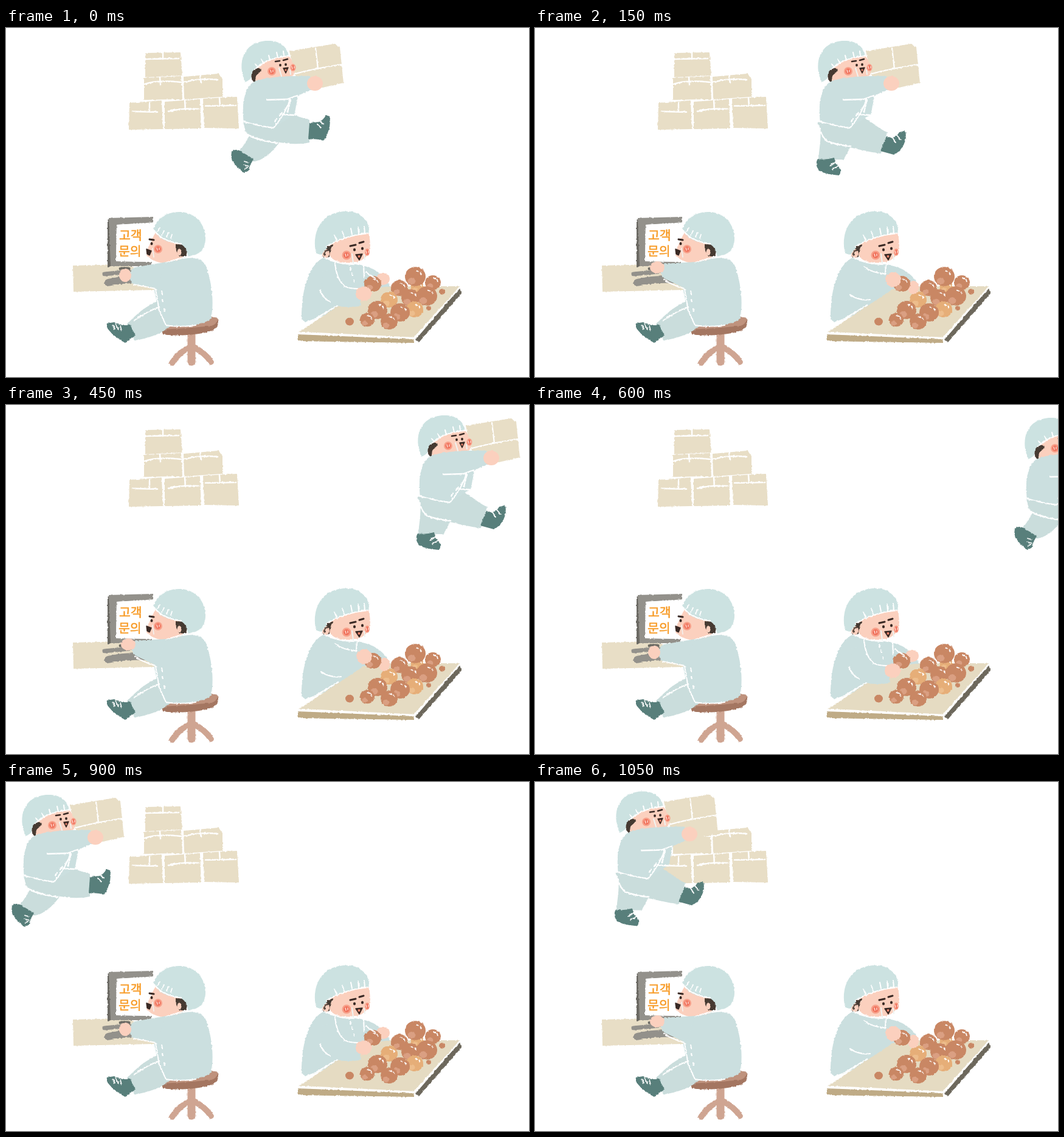
An HTML page that plays this animation: 860x573 px, repeating every 1.2 s.

```html
<!DOCTYPE html>
<html lang="ko">
<head>
<meta charset="utf-8">
<title>작업장</title>
<style>
html, body { margin: 0; width: 100%; height: 100%; overflow: hidden; background: #fff; }
svg { display: block; width: 100vw; height: 100vh; }
text { font: 500 20.5px "Noto Sans CJK KR", "Noto Sans CJK", sans-serif; }
</style>
</head>
<body>
<svg id="stage" viewBox="0 0 860 573"></svg>
<script>
const C = {
  coat: '#cbdfdf', cap: '#cce2e1', pants: '#cadddc', boot: '#587f7b', skin: '#fbd0be',
  hair: '#463a32', ink: '#3a2a25', cheek: '#f7a08a', box: '#e8dec6', white: '#fff',
  gray: '#93918b', dark: '#6b6963', nut: '#c98764', tan: '#e6ae78', spot: '#da9f82'
};

const fill = (d, c) => `<path d="${d}" fill="${c}"/>`;
const line = (d, w = 2, c = C.white) =>
  `<path d="${d}" fill="none" stroke="${c}" stroke-width="${w}" stroke-linecap="round" stroke-linejoin="round"/>`;
const oval = (x, y, rx, ry, c) => `<ellipse cx="${x}" cy="${y}" rx="${rx}" ry="${ry}" fill="${c}"/>`;
const group = (id, body, attrs = '') => `<g id="${id}" ${attrs}>${body}</g>`;
const cheek = (x, y, rx, ry = rx) =>
  oval(x, y, rx, ry, C.cheek) + oval(x, y, rx * .65, ry * .65, '#f0705a') +
  line(`M${x - 2},${y - 2}l1,4M${x + 2},${y - 2}l0,3`, 1.3, '#fde3da');
const mouth = d => fill(d, C.ink) + line(d, 1.5, C.ink);

function ball([x, y, r, light]) {
  const big = r > 9;
  return oval(x, y, r, r * .93, light ? C.tan : C.nut) +
    (big ? oval(x - r * .35, y + r * .45, r * .38, r * .33, light ? '#edbd8c' : C.spot) : '') +
    (big ? line(`M${x + r * .1},${y - r * .55}l3,1M${x + r * .5},${y - r * .4}l1.5,3`, 1.8) : '');
}

const stack = [
  ['M230,42L286,41L289,77L230,80Z', 'M230,51L284,50M258,41V51'],
  ['M228,83L287,80L289,116L228,117Z', 'M228,92Q252,85 287,89M253,81L254,94'],
  ['M293,81L349,76L355,84V112L294,116Z', 'M293,89Q320,82 348,85M319,78L321,90'],
  ['M204,124L255,120L257,165L203,166Z', 'M208,137L248,138M236,122V137'],
  ['M262,122L318,118L320,164L262,165Z', 'M267,137Q290,131 317,133M294,119L295,134'],
  ['M325,117L379,114L382,164L327,163Z', 'M328,128L378,127M351,115L352,128']
].map(([b, tape]) => fill(b, C.box) + line(b, 2, C.box) + line(tape, 2.5)).join('');

const strideLegs =
  fill('M400,177L449,188C438,205 421,218 408,219L383,203Q392,192 400,177Z', C.pants) +
  fill('M390,153L440,164C450,153 458,143 470,142L499,151L499,188C480,192 462,190 445,187C420,183 405,178 394,172Z', C.pants) +
  line('M391,164Q394,176 402,178Q420,185 446,189', 2.5) +
  fill('M371,203C378,197 385,201 392,206L407,215C404,222 399,226 401,233L392,238C383,232 373,222 370,212Z', C.boot) +
  fill('M499,156L515,154Q522,151 526,143L532,145C535,160 529,177 522,185Q509,181 497,183Z', C.boot) +
  line('M392,219L399,221M391,225L399,227M393,231L397,229M512,158L518,164M516,153L522,158', 1.8);

const stepLegs = group('',
  fill('M681,160C683,180 679,195 678,212H719Q726,202 731,190L690,172Z', C.pants) +
  fill('M676,150L728,160C738,150 748,143 754,143C768,152 780,163 791,167L781,202C755,199 715,189 690,180Z', C.pants) +
  line('M681,164Q685,177 693,182Q712,189 730,190', 2.5) +
  fill('M677,211C673,217 674,226 681,231C690,236 703,237 712,238Q716,234 713,225L706,217L704,209Q690,213 677,211Z', C.boot) +
  fill('M790,173C797,179 806,176 811,167L821,165C825,184 813,199 802,204L780,198Z', C.boot) +
  line('M697,222L707,216M701,228L711,222M800,176L805,184M807,172L813,179', 1.8),
  'transform="translate(-290 4)"');

const carrier =
  fill('M466,38L540,26L549,32L555,90L520,98L476,82Z', C.box) +
  line('M476,75Q510,66 551,60M509,33L513,67', 2.2) +
  fill('M408,72C425,52 450,46 465,46C473,55 477,68 473,77C462,84 440,83 420,89L409,88Z', C.skin) +
  fill('M404,72C409,65 417,64 420,68C418,74 413,75 411,80L410,90C404,88 402,79 404,72Z', C.hair) +
  fill('M394,89C386,76 385,55 392,42C400,26 418,20 434,21C452,22 463,32 465,46C445,47 425,54 413,66C406,67 403,74 403,83Z', C.cap) +
  oval(415, 82, 4.5, 6, C.skin) +
  line('M409,68C423,54 446,47 465,46', 2) +
  line('M410,59L414,64M420,51L424,58M432,45L434,53M445,40L447,49M456,38L457,46', 2) +
  fill('M405,90C420,80 470,78 500,79L505,101C490,106 483,109 480,113L474,143C462,148 450,158 438,165L391,155C388,130 390,102 405,90Z', C.coat) +
  line('M429,118L462,117L479,111M467,117Q461,138 440,164Q414,161 389,153M457,142L473,143M468,118L463,138', 2.3) +
  line('M461,131L459,135M453,140L450,144M445,149L442,153', 2.3) +
  oval(508, 91, 13, 12, C.skin);
const carrierFace =
  cheek(437, 71, 7) + cheek(472, 65, 4.5, 6) +
  line('M443,55L450,54M456,53L463,51', 2.6, C.ink) +
  oval(451, 61, 1.9, 2.3, C.ink) + oval(460, 60, 1.9, 2.3, C.ink) +
  mouth('M456,66L464,65L460,74Z') + oval(460, 69, 1.6, 1.8, '#e8836b') +
  line('M449,66L453,79M467,69L468,76', 2, '#eef4f2');

const desk =
  fill('M110,390L200,388L244,412V430L111,433Z', C.box) +
  fill('M167,315L175,311L175,390L167,393Z', C.dark) +
  fill('M169,312L242,310V320L182,323L181,383L240,384L236,391L172,391Z', C.gray) +
  fill('M182,323L246,319L240,384L181,383Z', C.white) +
  line('M162,404L203,400', 7, C.gray) + line('M168,418Q195,412 228,413', 12, C.gray) +
  line('M188,395H202', 5, C.dark);
const notice =
  '<g fill="#f79a24" stroke="#f79a24" stroke-width=".5"><text x="186" y="348">고객</text><text x="185" y="374">문의</text></g>';

const sitter =
  line('M305,503V548', 13, '#cfa592') + line('M303,524Q284,532 273,550', 10, '#cfa592') +
  line('M308,524Q326,532 337,548', 10, '#cfa592') +
  fill('M255,493C280,488 320,486 335,474L348,476C351,486 347,494 338,497C315,505 280,506 258,503Z', '#a47661') +
  fill('M255,493C280,488 320,486 335,474L348,476Q349,485 338,489C310,492 280,494 255,495Z', '#bf927d') +
  fill('M254,447C230,455 215,470 199,486L211,513C240,509 260,499 272,488Z', C.pants) +
  fill('M166,485L178,483C186,488 195,489 204,487L213,505L204,511L196,517C182,509 168,498 165,489Z', C.boot) +
  line('M175,488L179,494M181,487L185,495M188,489L190,497', 1.8) +
  fill('M256,384C290,372 318,373 328,389C338,415 343,450 337,477C320,491 285,491 263,488L251,466L243,426Z', C.coat) +
  fill('M246,334C242,345 235,354 231,370C232,378 245,384 258,386L290,379L294,358C275,352 255,346 246,334Z', C.skin) +
  fill('M279,355L296,356Q299,366 296,375L285,375Q278,366 279,355Z', C.hair) +
  fill('M243,328C250,310 268,301 288,302C312,304 328,322 328,346C328,362 318,374 299,375C298,367 296,360 288,355C265,353 246,345 243,328Z', C.cap) +
  oval(285, 368, 3.5, 5.5, C.skin) +
  line('M244,333Q258,351 288,354', 2.2) +
  line('M249,334L253,328M256,340L260,333M264,343L267,336M271,345L273,339', 1.8) +
  line('M258,387Q286,376 312,376', 2.2) +
  line('M246,429L252,464L263,488Q285,492 312,488M211,480Q238,462 251,459', 2) +
  line('M256,432L257,437M257,446L258,450M260,461L261,465', 2.2);
const sitterFace =
  line('M236,347L243,348', 3, C.ink) + oval(239.5, 354, 2, 2.6, C.ink) +
  mouth('M231,363L239,366L236,373L232,371Z') + cheek(250, 363, 7) +
  line('M241,362L243,376', 1.8, '#f3efec');

const typeLow =
  fill('M264,384L212,393C201,397 202,414 208,420L247,427Z', C.coat) +
  line('M210,421L246,428', 2.2) + oval(196, 406, 10, 11, C.skin);
const typeHigh =
  fill('M264,384L214,387C204,391 205,404 212,411L248,428Z', C.coat) +
  line('M212,413Q225,422 246,428', 2.2) + oval(201, 393, 12, 10, C.skin);

const cookBody =
  fill('M522,377C497,390 486,430 486,477L491,483L600,446L632,426C622,402 600,389 568,388L545,384Z', C.coat) +
  fill('M528,358C545,347 570,338 596,337C600,350 600,365 594,373C585,386 560,389 540,381C530,375 525,366 528,358Z', C.skin) +
  fill('M520,362L538,355Q532,364 532,376L521,377Z', C.hair) +
  oval(526, 370, 6, 7, C.skin) + line('M530,365Q523,365 524,373', 1.8, C.hair) +
  fill('M509,366C504,340 515,315 535,306C555,298 575,300 586,310C596,318 598,330 596,336C570,338 545,347 530,357L519,372Q511,372 509,366Z', C.cap) +
  line('M527,359Q555,341 597,337', 2.2) +
  line('M540,340L544,349M553,334L556,343M567,329L569,339M579,327L580,338M589,326L590,336', 2) +
  line('M524,377Q546,388 570,388', 2);
const cookFace =
  cheek(560, 373, 7.5) + cheek(594, 368, 4, 6) +
  line('M566,358L575,356M581,353L588,351', 3, C.ink) +
  oval(573, 364, 2.1, 2.6, C.ink) + oval(586, 362, 2.1, 2.6, C.ink) +
  mouth('M575,372L586,371L581,381Z') + oval(580.5, 375, 2, 2, '#e8836b') +
  line('M569,371L571,386M589,372L590,380', 2, '#eef4f2');

const table =
  fill('M482,499L588,429L634,424L748,424L671,510Z', '#e5dbc2') +
  fill('M480,503L671,511V517L480,514Z', '#bfab86') +
  fill('M673,512L746,427L749,436L679,516Z', '#6d685c') +
  line('M482,500L671,509L747,425M485,492L546,455', 2.6);

const pile = [
  [565, 482, 7], [717, 433, 5], [695, 460, 4], [676, 425, 11, 1], [673, 408, 17], [702, 418, 13],
  [647, 427, 14], [630, 446, 14, 1], [692, 440, 17], [665, 443, 15], [672, 462, 14, 1],
  [611, 463, 16], [594, 479, 12], [648, 467, 16], [630, 482, 14]
].map(ball).join('');

const held = ball([603, 420, 14]);
const kneadLow =
  oval(620, 412, 11, 10, C.skin) + held +
  fill('M520,400C517,425 525,441 533,450C545,459 565,460 584,456L580,428L556,425L545,396Z', C.coat) +
  line('M516,430Q521,443 533,450M541,386Q543,412 557,424Q566,428 578,428M588,390L589,410M592,401L607,411', 2.2) +
  line('M566,393L567,397M569,403L570,407M572,413L573,417', 2.2) +
  oval(588, 436, 13, 12, C.skin);
const kneadHigh =
  oval(622, 426, 9, 11, C.skin) + held +
  line('M518,438Q533,448 551,446M541,392Q554,402 577,404M577,390L576,403', 2.2) +
  oval(589, 413, 13, 12, C.skin);

const stage = document.getElementById('stage');
const rough = 'filter="url(#rough)"';
stage.innerHTML = `<defs><filter id="rough" filterUnits="userSpaceOnUse" x="0" y="0" width="860" height="573" color-interpolation-filters="sRGB">
  <feTurbulence type="fractalNoise" baseFrequency=".25" numOctaves="2" seed="4"/>
  <feDisplacementMap in="SourceGraphic" scale="3" xChannelSelector="R" yChannelSelector="G"/></filter></defs>` +
  group('stack', stack, rough) +
  group('runner', group('', group('stride', strideLegs) + group('step', stepLegs) + carrier, rough) + carrierFace) +
  group('office', desk + sitter + group('typeLow', typeLow) + group('typeHigh', typeHigh), rough) +
  notice + sitterFace +
  group('kitchen', cookBody + table + pile + group('kneadLow', kneadLow) + group('kneadHigh', kneadHigh), rough) +
  cookFace;

const $ = id => document.getElementById(id);
const STEP = 150;
const route = [[0, 0], [78, 0], [155, 0], [290, -4], [418, 0], [-471, -4], [-361, 0], [-254, -5.5]];
let shown = -1;

function draw(t) {
  const i = Math.floor(t / STEP) % route.length;
  if (i === shown) return;
  shown = i;
  const odd = i % 2 === 1;
  $('runner').setAttribute('transform', `translate(${route[i]})`);
  for (const id of ['stride', 'typeLow', 'kneadLow']) $(id).setAttribute('display', odd ? 'none' : 'inline');
  for (const id of ['step', 'typeHigh', 'kneadHigh']) $(id).setAttribute('display', odd ? 'inline' : 'none');
}

const start = performance.now();
function tick() {
  draw(performance.now() - start);
  requestAnimationFrame(tick);
}
tick();
</script>
</body>
</html>
```
